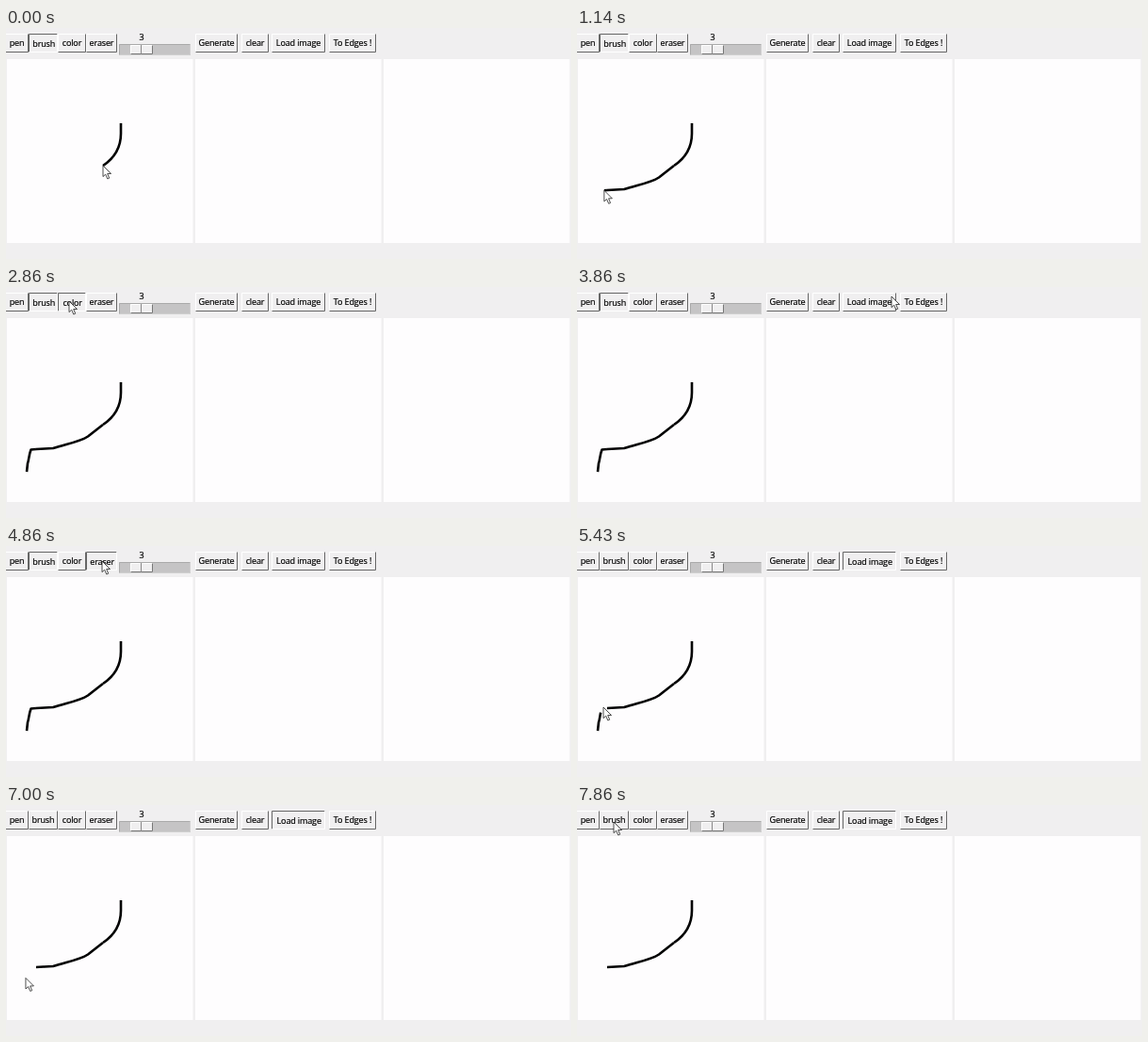
Animation, 600 px wide and 245 px high, one loop 8000 ms. Source, as an HTML page:

```html
<!DOCTYPE html>
<html lang="en">
<head>
<meta charset="utf-8">
<title>Sketch pad</title>
<style>
  html, body { margin: 0; width: 100%; height: 100%; overflow: hidden; background: #f0eff0; }
  svg { display: block; width: 600px; height: 245px; }
  text {
    font: 9px "Open Sans", "Noto Sans", sans-serif; letter-spacing: -.13px; text-anchor: middle;
    fill: #000; stroke: #000; stroke-width: .2;
  }
  .ink { fill: none; stroke: #000; stroke-width: 2.6; stroke-linejoin: round; }
  .crumbs { fill: none; stroke: #222; stroke-width: 1.1; }
  .edge { fill: none; stroke-width: 1; }
</style>
</head>
<body>
<svg id="stage" viewBox="0 0 600 245" xmlns="http://www.w3.org/2000/svg"></svg>
<script>
const LOOP = 8000, STEPS = 56;
const FACE = '#f0eff0';
const stage = document.getElementById('stage');

function add(tag, attrs, parent = stage) {
  const el = document.createElementNS('http://www.w3.org/2000/svg', tag);
  for (const key in attrs) el.setAttribute(key, attrs[key]);
  parent.append(el);
  return el;
}

function show(el, visible) {
  el.setAttribute('visibility', visible ? 'visible' : 'hidden');
}

function box(x, y, width, height, fill, parent, topLeft, bottomRight) {
  add('rect', { x, y, width, height, fill }, parent);
  if (!topLeft) return;
  const l = x + .5, t = y + .5, r = x + width - .5, b = y + height - .5;
  add('path', { class: 'edge', stroke: topLeft, d: `M${l} ${b}V${t}H${r}` }, parent);
  add('path', { class: 'edge', stroke: bottomRight, d: `M${l} ${b}H${r}V${t}` }, parent);
}

function button(label, left, right) {
  const face = (topLeft, bottomRight, shift) => {
    const g = add('g', {});
    box(left, 6, right - left, 20, FACE, g, topLeft, bottomRight);
    add('text', { x: (left + right) / 2 + shift, y: 19 + shift }, g).textContent = label;
    return g;
  };
  const up = face('#fff', '#666', 0), down = face('#666', '#fff', .7);
  return pressed => { show(up, !pressed); show(down, pressed); };
}

for (const x of [1, 201, 401]) box(x, 33, 197.5, 195, '#fefdfe');

const [brush, color, eraser, load, ...idle] = [
  ['brush', 24, 55], ['color', 55, 85], ['eraser', 85, 118], ['Load image', 282, 339],
  ['pen', -1, 24], ['Generate', 201, 246], ['clear', 250, 279], ['To Edges !', 343, 393]
].map(spec => button(...spec));
idle.forEach(set => set(false));

// Brush size slider
add('text', { x: 144, y: 13 }).textContent = '3';
box(120, 17, 76, 12, '#c5c4c5', stage, '#aaa', '#d0d0d0');
box(132, 18, 24, 10, FACE, stage, '#fff', '#777');
add('path', { class: 'edge', stroke: '#888', d: 'M143.5 18V28' });

const ink = d => add('path', { class: 'ink', d, pathLength: 1, 'stroke-dasharray': '1 2' });
ink('M122 101V112C122 126 115 138 103 146');
const sweep = ink('M103 146L87 158.5C79 164 66 166 50 171L32 172');
const hook = ink('M32 172L26.5 172.5C24 179 24.5 183 23 187L22 196');
const crumbs = add('path', { class: 'crumbs', d: 'M25.7 172L25 174M24.2 175.5L23.2 179.5M23.2 185Q21 188 20.5 192' });
const cursor = add('path', {
  d: 'M0 0V11.6L2.7 9.2L4.8 14L6.7 13.2L4.7 8.5H8.5Z',
  fill: '#fff', stroke: '#222', 'stroke-width': .8
});

// Pointer stops after the drawing is done: [step, x, y]
const STOPS = [
  [13, 22, 196], [16, 30, 164], [19, 67, 15], [21, 67, 15], [27, 334, 10], [33, 102, 16],
  [35, 102, 16], [38, 28, 171], [40, 21, 198], [43, 20, 191], [50, 21, 183], [55, 39, 18]
];

const phase = (step, from, to) => Math.min(1, Math.max(0, (step - from) / (to - from)));
const ease = k => k * k * (3 - 2 * k);

function pointer(step) {
  const i = STOPS.findIndex(stop => stop[0] >= step);
  if (i < 1) return STOPS[0].slice(1);
  const [from, x0, y0] = STOPS[i - 1], [to, x1, y1] = STOPS[i];
  const k = ease(phase(step, from, to));
  return [x0 + (x1 - x0) * k, y0 + (y1 - y0) * k];
}

function tipOf(path, share) {
  const { x, y } = path.getPointAtLength(path.getTotalLength() * share);
  return [x, y];
}

function render(step) {
  const swept = phase(step, 0, 7.4), hooked = phase(step, 7.4, 13), erased = phase(step, 37, 40);
  sweep.setAttribute('stroke-dashoffset', 1 - swept);
  hook.setAttribute('stroke-dashoffset', 1 - hooked - erased);
  show(sweep, swept > 0);
  show(hook, hooked > 0 && erased < 1);
  show(crumbs, step >= 40 && step < 46);

  const [x, y] = hooked === 1 ? pointer(step) : hooked > 0 ? tipOf(hook, hooked) : tipOf(sweep, swept);
  cursor.setAttribute('transform', `translate(${x} ${y})`);

  brush(step < 35);
  color(step === 19 || step === 20);
  eraser(step === 33 || step === 34);
  load(step >= 35);
}

const start = performance.now();
function tick() {
  const time = (performance.now() - start) % LOOP;
  render(Math.min(STEPS - 1, Math.floor((time + 3) * STEPS / LOOP)));
  requestAnimationFrame(tick);
}
tick();
</script>
</body>
</html>
```
